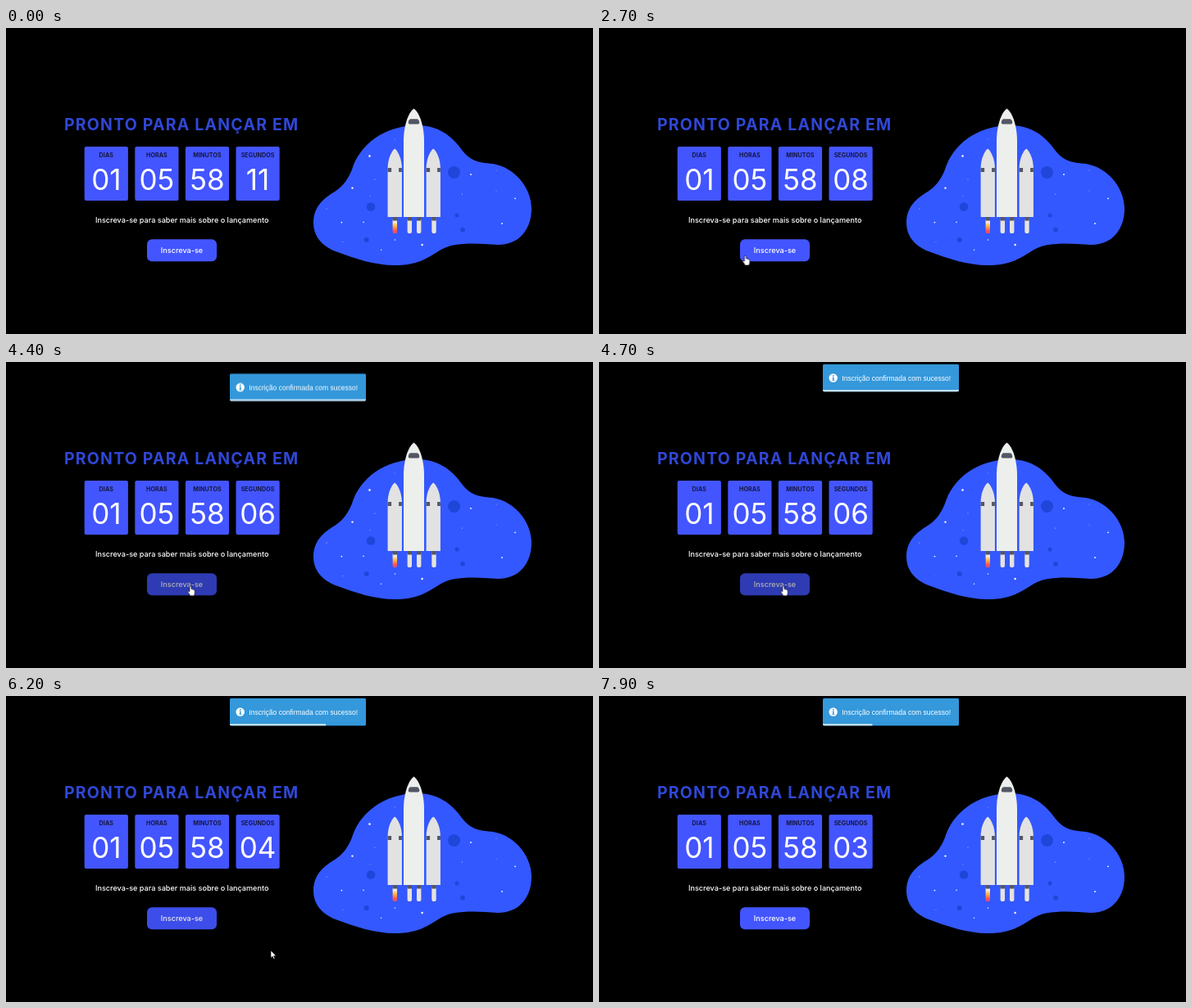
These frames come from a looping animation (716x374 px, 8000 ms). An HTML page:

```html
<!DOCTYPE html>
<html lang="pt-BR">
<head>
<meta charset="utf-8">
<title>Pronto para lançar</title>
<style>
  html, body { margin: 0; width: 100%; height: 100%; overflow: hidden; background: #000; }
  svg { display: block; width: 716px; height: 374px; font-family: Inter, sans-serif; fill: #fff; }

  .title { font-size: 19.5px; font-weight: 700; letter-spacing: 1.2px; fill: #3047d6; }
  .centered text { text-anchor: middle; }
  .label { font-size: 7.1px; font-weight: 700; letter-spacing: .1px; fill: #14173f; }
  .value { font-size: 35px; }
  .note { font-size: 9.1px; font-weight: 500; }
  .panel { fill: #4355ff; }
  .crater { fill: #1f46d9; }
  .dark { fill: #535765; }
  .toast-text { font: 8.5px "Liberation Sans", Arial, sans-serif; }

  /* Every animation is paused and sought through --t (ms). */
  .timed { animation: 8s linear both paused; animation-delay: calc(var(--t, 0) * -1ms); }
  #button { animation-name: hover; }
  #cursor { animation-name: travel; }
  #arrow { animation-name: arrow; animation-timing-function: step-end; }
  #hand { animation-name: hand; animation-timing-function: step-end; }
  #toast {
    animation: drop 700ms cubic-bezier(.215, .61, .355, 1) both paused;
    animation-delay: calc((4003 - var(--t, 0)) * 1ms);
  }
  #progress {
    transform-origin: 273px 0;
    animation: drain 5s linear both paused;
    animation-delay: calc((4725 - var(--t, 0)) * 1ms);
  }

  @keyframes hover {
    0%, 33.75% { opacity: 1; }
    37.5%, 75% { opacity: .7; }
    78.5%, 100% { opacity: 1; }
  }
  @keyframes drop {
    0% { opacity: 0; transform: translateY(-1560px); }
    60% { opacity: 1; transform: translateY(13px); }
    75% { transform: translateY(-5.2px); }
    90% { transform: translateY(2.6px); }
    100% { transform: none; }
  }
  @keyframes drain { to { transform: scaleX(0); } }
  @keyframes arrow {
    0% { opacity: 1; }
    33.5% { opacity: 0; }
    74.5%, 100% { opacity: 1; }
  }
  @keyframes hand {
    0% { opacity: 0; }
    33.5% { opacity: 1; }
    74.5%, 100% { opacity: 0; }
  }
  @keyframes travel {
    0%, 6.25% { transform: translate(620px, 382px); }
    7.5% { transform: translate(617px, 364px); }
    12.5% { transform: translate(606px, 318px); }
    15% { transform: translate(597px, 300px); }
    16.25% { transform: translate(586px, 295px); }
    17.5% { transform: translate(547px, 303px); }
    18.75% { transform: translate(505px, 318px); }
    21.25% { transform: translate(430px, 333px); }
    25% { transform: translate(300px, 335px); }
    28.75% { transform: translate(180px, 334px); }
    30% { transform: translate(160px, 333px); }
    31.25% { transform: translate(158px, 315px); }
    32.5% { transform: translate(164px, 297px); }
    33.75% { transform: translate(178.5px, 278px); }
    37.5% { transform: translate(205px, 275px); }
    40% { transform: translate(216px, 275px); }
    42.5%, 73.75% { transform: translate(225px, 273.6px); }
    75% { transform: translate(245px, 292px); }
    76.25% { transform: translate(284px, 304px); }
    77.5% { transform: translate(323px, 311px); }
    81.25% { transform: translate(480px, 336px); }
    83.75% { transform: translate(590px, 325px); }
    86.25% { transform: translate(655px, 302px); }
    87.5% { transform: translate(690px, 285px); }
    88.75%, 100% { transform: translate(724px, 270px); }
  }
</style>
</head>
<body>
<svg viewBox="0 0 716 374">
  <defs>
    <linearGradient id="fire" x2="0" y2="1">
      <stop offset=".3" stop-color="#f3e6da"/>
      <stop offset=".45" stop-color="#ffc860"/>
      <stop offset=".65" stop-color="#ff8f42"/>
      <stop offset=".85" stop-color="#f2505c"/>
    </linearGradient>
    <g id="booster">
      <path fill="#e2e2e3" d="M0 231V172C0 161 4 151 8.6 147.5C13.2 151 17.3 161 17.3 172V231Z"/>
      <path class="dark" d="M0 171h4.5v5H0zM13.5 171h3.8v5h-3.8z"/>
    </g>
  </defs>

  <text class="title" x="71" y="125">PRONTO PARA LANÇAR EM</text>
  <g class="centered">
    <g id="cards"></g>
    <text class="note" x="214.7" y="237.6">Inscreva-se para saber mais sobre o lançamento</text>
    <g id="button" class="timed">
      <rect class="panel" x="172" y="258.3" width="85" height="27" rx="6"/>
      <text class="note" x="214.5" y="275">Inscreva-se</text>
    </g>
  </g>

  <path fill="#3358ff" d="M375 238C375 218 388 208 401 200C412 193 418 183 422 173C431 143 461 119 502 119C528 119 545 133 556 149C566 162 576 164.5 589 165.5C617 167 641 193 641 221C641 246 626 265 600 265C582 264 566 262 545 265.5C524 269 516 290 474 290C450 290 426 282 402 273C386 267 375 255 375 238Z"/>
  <g class="crater">
    <circle cx="546.5" cy="176.5" r="7.5"/>
    <circle cx="445" cy="218.5" r="5.3"/>
    <circle cx="439.7" cy="259" r="3"/>
    <circle cx="550" cy="229" r="2.5"/>
    <circle cx="557" cy="246.6" r="2.9"/>
  </g>
  <g id="stars"></g>

  <g id="engines"></g>
  <use href="#booster" x="465.6"/>
  <use href="#booster" x="512.6"/>
  <path fill="#edefec" d="M485 231V138C485 121 490 104 497.5 98.5C505 104 510 121 510 138V231Z"/>
  <path class="dark" d="M493 111.2H502Q504.3 112.5 504.3 115.5Q504.3 117.5 502.5 117.5H492.5Q490.7 117.5 490.7 115.5Q490.7 112.5 493 111.2Z"/>

  <g id="toast">
    <clipPath id="frame"><rect x="273" y="2.6" width="166" height="34" rx="2"/></clipPath>
    <g clip-path="url(#frame)">
      <rect fill="#3498db" x="273" y="2.6" width="166" height="34"/>
      <rect id="progress" x="273" y="34" width="166" height="2.6" fill-opacity=".7"/>
    </g>
    <circle cx="285.7" cy="19.5" r="5.2"/>
    <path fill="#3498db" d="M285 16h1.6v1.5H285zM284.6 18.4h2v3.4h.7v.9h-2.9v-.9h.7v-2.5h-.5z"/>
    <text class="toast-text" x="296.3" y="22.6">Inscrição confirmada com sucesso!</text>
  </g>

  <g id="cursor" class="timed" stroke="#000" stroke-width=".6" stroke-linejoin="round">
    <path id="arrow" class="timed" d="M0 0V9.2L2.1 7.3L3.5 10.4L5 9.7L3.6 6.7H6.5Z"/>
    <path id="hand" class="timed" d="M-1 .8Q0 -.5 1 .8V4Q2 3.4 2.6 4.3Q3.6 3.8 4 4.8Q5.3 4.6 5.3 6V8.5Q5.3 10 4.4 12H-.4Q-1.4 9.5 -3.2 7.4Q-3.3 6 -2 6.3L-1 7.2Z"/>
  </g>
</svg>
<script>
  const LOOP = 8000, STEP = 100;
  const ticks = [100, 1100, 2100, 3100, 4100, 5200, 6200, 7200];
  const byId = id => document.getElementById(id);

  const cards = [["DIAS", "01"], ["HORAS", "05"], ["MINUTOS", "58"], ["SEGUNDOS", "11"]];
  byId("cards").innerHTML = cards.map(([label, value], i) => {
    const x = 95.7 + i * 61.6, mid = x + 26.6;
    return `<rect class="panel" x="${x}" y="145" width="53.2" height="66" rx="2"/>
      <text class="label" x="${mid}" y="157.7">${label}</text>
      <text class="value" x="${mid}" y="198.2">${value}</text>`;
  }).join("");
  const seconds = byId("cards").lastElementChild;

  const stars = [
    [443.5, 156.5, 1.3], [422.5, 195.6, 1.2], [507.6, 265, 1.2], [409.4, 237.6, .9],
    [567, 179, .9], [621, 208.3, .9], [605, 239, .9], [436, 237.4, .8], [457.6, 271.2, .8],
    [474.5, 259, .8], [391, 221, .6], [450, 185, .6], [411, 261.5, .5], [556.5, 203, .6],
    [598, 199, .5], [598, 174, .5], [444, 205.5, .5], [474, 136, .5]
  ];
  byId("stars").innerHTML = stars.map(([x, y, r]) =>
    `<circle cx="${x}" cy="${y}" r="${r}" opacity="${Math.min(1, r + .1)}"/>`).join("");

  byId("engines").innerHTML = [474.3, 492.3, 503.7, 522].map((x, i) =>
    `<rect x="${x - 2.7}" y="232" width="5.4" height="19" rx="2.6" fill="${i ? "#e6e3dd" : "url(#fire)"}"/>
     <rect class="dark" x="${x - 2.7}" y="231" width="5.4" height="4.5"/>`).join("");

  let start;
  function draw(now) {
    start ??= now;
    const t = Math.floor((now - start) % LOOP / STEP) * STEP;
    document.documentElement.style.setProperty("--t", t);
    const left = 11 - ticks.filter(tick => tick <= t).length;
    seconds.textContent = String(left).padStart(2, "0");
    requestAnimationFrame(draw);
  }
  requestAnimationFrame(draw);
</script>
</body>
</html>
```
